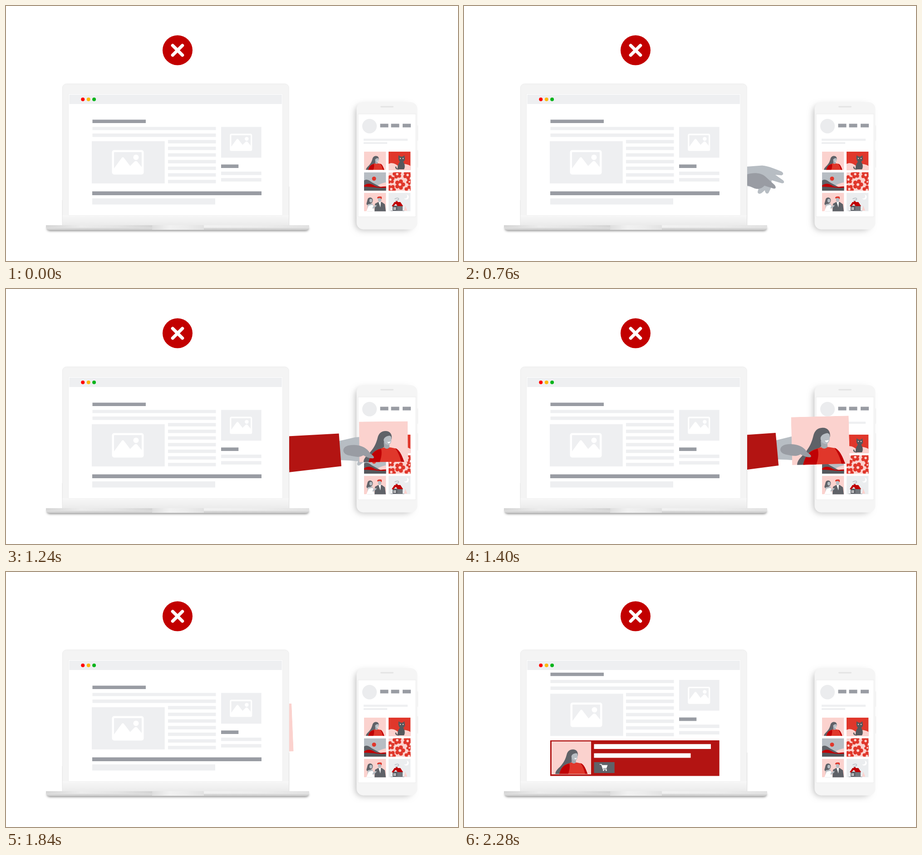
Recreate the animation shown at these times as an HTML page with a canvas. Size 996 by 562 pixels, loop 5.2 s.

```html
<!DOCTYPE html>
<html lang="en">
<head>
<meta charset="utf-8">
<title>Picture grab</title>
<style>
html, body { margin: 0; width: 100%; height: 100%; overflow: hidden; background: #fff; }
canvas { display: block; }
</style>
</head>
<body>
<canvas id="stage" width="996" height="562"></canvas>
<script>
const ctx = document.getElementById('stage').getContext('2d');
const LOOP = 5200, STEP = 40;
const PALE = '#eeeff1', GREY = '#999ca3', LIGHT = '#b7bdc3', DARK = '#5f6268';
const RED = '#b31412', BRIGHT = '#e0372b', DEEP = '#c00205', PINK = '#fbd2ce';

// Arm pose over time: ms, x, y, angle
const POSES = [
  [520, 534, 387, 0], [760, 610, 378, 0], [1040, 716, 360, 0],
  [1160, 736, 356, -.01], [1280, 731, 354, -.025], [1400, 690, 353, -.035],
  [1600, 590, 358, -.045], [1840, 473, 366, -.052]
];
const GRAB = 1000, GROWN = 1320, HIDDEN = 1880;

const clamp = v => Math.max(0, Math.min(1, v));

function rect(x0, y0, x1, y1, color) {
  ctx.fillStyle = color;
  ctx.fillRect(x0, y0, x1 - x0, y1 - y0);
}
function round(x0, y0, x1, y1, r, color) {
  ctx.fillStyle = color;
  ctx.beginPath();
  ctx.roundRect(x0, y0, x1 - x0, y1 - y0, r);
  ctx.fill();
}
function dot(x, y, r, color, ry = r) {
  ctx.fillStyle = color;
  ctx.beginPath();
  ctx.ellipse(x, y, r, ry, 0, 0, Math.PI * 2);
  ctx.fill();
}
function shape(d, color) {
  ctx.fillStyle = color;
  ctx.fill(new Path2D(d));
}
function line(d, color, width, cap = 'round') {
  ctx.strokeStyle = color;
  ctx.lineWidth = width;
  ctx.lineCap = cap;
  ctx.stroke(new Path2D(d));
}
function fade(x0, y0, x1, y1, ...colors) {
  const g = ctx.createLinearGradient(x0, y0, x1, y1);
  colors.forEach((c, i) => g.addColorStop(i / (colors.length - 1), c));
  return g;
}
function group(x, y, scale, draw) {
  ctx.save();
  ctx.translate(x, y);
  ctx.scale(scale, scale);
  draw();
  ctx.restore();
}
function tile(x, y, w, h, color, draw, scale = 1) {
  group(x, y, scale, () => {
    ctx.beginPath();
    ctx.rect(0, 0, w, h);
    ctx.clip();
    rect(0, 0, w, h, color);
    draw();
  });
}

function portrait(x, y, width) {
  tile(x, y, 127, 105.5, PINK, () => {
    shape('M69 25C80 25 86 33 85 44L80 58L62 68C56 80 44 82 36 90L28 106H11C11 92 25 86 33 74C41 64 45 54 48 43C51 31 58 25 69 25Z', DARK);
    shape('M24 106C29 86 38 75 54 71L66 67L82 68L97 71C106 78 112 92 117 106Z', BRIGHT);
    shape('M24 106C29 86 38 75 57 71C60 82 57 95 53 106Z', DEEP);
    shape('M94 70C106 74 112 92 117 106H109C106 92 101 80 94 70Z', DEEP);
    shape('M64 54H78L79 67C76 72 69 72 65 68Z', '#a4a9af');
    shape('M64 50C63 43 70 38 79 37C84 38 85 42 84 48C84 56 80 61 75 61C69 60 65 56 64 50Z', LIGHT);
    shape('M73 53Q78 54 82 52Q80 58 76 57Z', '#fff');
  }, width / 127);
}

function cat(x, y) {
  tile(x, y, 48.5, 40.5, BRIGHT, () => {
    shape('M0 27C8 23 15 27 20 31C29 26 40 26 49 32V41H0Z', PINK);
    shape('M22 8L27 11H31L35 8L36 16C36 20 33 22 32 22C36 27 37 34 34 39H22C18 38 20 28 25 22C22 20 21 15 22 8Z', '#55585c');
    line('M23 38Q16 39 16 34', '#55585c', 2.5);
    dot(26, 15, 1.2, PINK);
    dot(32, 15, 1.2, PINK);
  });
}

function hills(x, y) {
  tile(x, y, 48.5, 40.5, LIGHT, () => {
    dot(22, 14, 4.5, BRIGHT);
    shape('M49 22C40 24 33 26 25 32V41H49Z', PINK);
    shape('M0 18C7 14 11 18 17 22L41 35H0Z', DARK);
    shape('M0 29C8 23 16 25 24 30C32 34 41 31 49 31V36H0Z', DEEP);
    shape('M0 32C15 31 31 36 49 34V41H0Z', '#55585c');
  });
}

function flower(x, y, r, turn) {
  for (let i = 0; i < 5; i++) {
    const a = turn + i * Math.PI * 2 / 5;
    dot(x + Math.cos(a) * r * .62, y + Math.sin(a) * r * .62, r * .39, BRIGHT);
  }
  dot(x, y, r * .5, BRIGHT);
  dot(x, y, r * .27, PINK);
}
function flowers(x, y) {
  tile(x, y, 48.5, 40.5, PINK, () => {
    [[25, 27, 11.5], [19, 4, 10], [42, 6, 10], [4, 16, 9.5], [6, 37, 10], [45, 39, 10], [46, 21, 7]]
      .forEach(([fx, fy, r], i) => flower(fx, fy, r, i * .7));
  });
}

function couple(x, y) {
  tile(x, y, 48.5, 40.5, PINK, () => {
    shape('M13 10C19 10 21 16 18 21L12 26C7 29 4 25 6 21C8 15 7 11 13 10Z', DARK);
    dot(15, 17, 3.2, LIGHT, 4);
    shape('M8 25L18 23L22 30L18 41H7Z', LIGHT);
    shape('M10 28L19 26L24 41H5Z', '#fff');
    shape('M24 24L31 20L39 20L46 25L48 41H23Z', DARK);
    shape('M32 20H37L36 32Z', '#fff');
    shape('M30 10H38V17C37 21 32 21 31 17Z', LIGHT);
    shape('M29 12C28 8 33 7 38 8C40 10 39 13 38 14L36 11Z', BRIGHT);
    line('M20 33L26 28', LIGHT, 3);
  });
}

function house(x, y) {
  tile(x, y, 48.5, 40.5, '#ebedef', () => {
    dot(39, 9, 5.5, '#fff');
    dot(36.5, 7.5, 4.8, '#ebedef');
    line('M17 20C12 15 25 17 22 12Q19 10 14 13', LIGHT, 1.5);
    shape('M34 39L37 28L41 39Z', PINK);
    rect(9, 28, 31, 39.5, DARK);
    for (let i = 0; i < 3; i++) line(`M20 ${31 + i * 3}H31`, LIGHT, .7);
    shape('M7 29L13 20H26L32 29H20L16 24L10 30Z', DEEP);
    rect(16, 18, 20, 22, DEEP);
    rect(11, 32, 16, 37, '#fff');
    line('M13.5 32V37M11 34.5H16', DARK, .8);
    line('M5 39.5H34', GREY, 1);
  });
}

function phone() {
  ctx.save();
  ctx.shadowColor = 'rgba(0,0,0,.25)';
  ctx.shadowBlur = 14;
  ctx.shadowOffsetX = -5;
  ctx.shadowOffsetY = 3;
  round(775, 216, 900, 491, 15, '#f5f5f5');
  ctx.restore();
  round(905, 263, 908, 297, 1, '#f1f1f1');
  round(905, 318, 908, 356, 1, '#f1f1f1');
  round(772.5, 212, 906.5, 492.5, 15, '#f5f5f5');
  round(825, 220.5, 854, 223.5, 1.5, '#e4e4e4');
  rect(775.5, 237.5, 903.5, 465, '#ececec');
  rect(776.5, 238.5, 902.5, 464, '#fff');
  dot(801, 264.8, 16, '#ebecee');
  [824.5, 848.5, 874].forEach(x => rect(x, 259.5, x + 18, 267.5, GREY));
  rect(788, 292.5, 885, 297, PALE);
  rect(788, 300, 840, 304, PALE);
  portrait(789, 321, 48.5);
  cat(843, 321);
  hills(789, 366.5);
  flowers(843, 366.5);
  couple(789, 412);
  house(843, 412);
}

// Smooth interpolation through the pose keys
function pose(t) {
  const last = POSES.length - 1;
  let i = 0;
  while (i < last - 1 && t >= POSES[i + 1][0]) i++;
  const a = POSES[i], b = POSES[i + 1], span = b[0] - a[0], u = (t - a[0]) / span;
  const slope = (k, c) => {
    const p = POSES[Math.max(0, k - 1)], n = POSES[Math.min(last, k + 1)];
    return (n[c] - p[c]) / (n[0] - p[0]) * span;
  };
  const u2 = u * u, u3 = u2 * u;
  return [1, 2, 3].map(c =>
    (2 * u3 - 3 * u2 + 1) * a[c] + (u3 - 2 * u2 + u) * slope(i, c) +
    (3 * u2 - 2 * u3) * b[c] + (u3 - u2) * slope(i + 1, c));
}

function openHand() {
  shape('M-12 -20L13 -24L47 -26.5C62 -25 78 -18 90 -13C96 -9 93 -4 87 -5L76 -6L93 6C98 11 94 14 88 12L68 6L66 24L61 34C57 38 53 33 53 28L46 34C40 38 34 35 39 26L30 20L-12 18Z', LIGHT);
  shape('M-12 -5L14 -7C28 -11 42 -11 53 -3L74 16C79 22 77 26 71 24L52 18C46 25 36 27 28 23L14 17L-12 12Z', GREY);
}
function fist(t) {
  shape('M-10 -17L0 -20L34 -27C50 -29 62 -24 72 -21L80 -5L74 12L54 20L54 26L42 35C37 36 35 33 39 26L20 24L-10 22Z', LIGHT);
  const w = 48.5 * (1 + 1.62 * clamp((t - GRAB) / (GROWN - GRAB)));
  ctx.save();
  ctx.translate(96, -16);
  ctx.rotate(.01);
  portrait(-w / 2, -w * .415, w);
  ctx.restore();
  shape('M7 1C8 -8 20 -11 32 -10C48 -9 60 -2 66 9C73 14 76 18 73 20C65 21 58 17 51 13C41 19 31 15 21 13C12 11 7 7 7 1Z', GREY);
}
function arm(t) {
  if (t < POSES[0][0] || t >= HIDDEN) return;
  const [x, y, a] = pose(t);
  ctx.save();
  ctx.translate(x, y);
  ctx.rotate(a);
  t < GRAB ? openHand() : fist(t);
  shape('M-2 -36L2 36L-300 65L-300 -26Z', RED);
  ctx.restore();
}

function pictureIcon(x, y, scale) {
  group(x, y, scale, () => {
    round(-35, -27, 35, 27, 5, '#fff');
    round(-30.5, -22.5, 30.5, 22.5, 1, PALE);
    shape('M-31 14L-14 -9C-12 -12 -10 -12 -8 -9L5 8L14 -1C17 -4 20 -3 22 0L31 11V23H-31Z', '#fff');
    dot(18, -11, 6, '#fff');
  });
}

function article(shift) {
  const big = shift ? 1 : 0;
  ctx.save();
  ctx.translate(0, shift);
  rect(190.5, 250.5, 308, 258, GREY);
  rect(190.5, 266.5, 462.5, 273.5, PALE);
  rect(190.5, 281, 462.5, 288.5, PALE);
  for (let i = 0; i < 7; i++) rect(357, 295.3 + i * 14.65, 462.5, 302.8 + i * 14.65, PALE);
  rect(189 + big, 298 - big, 349.7 + big, 391 - big, PALE);
  pictureIcon(268.5 + big, 344.5 - big, 1);
  rect(474, 266.5, 562.7, 334.3, PALE);
  pictureIcon(517.8, 300.5, .7);
  rect(474, 349.3, 512.3, 357, GREY);
  rect(474, 365, 562.7, 372.5, PALE);
  rect(474, 379.3, 562.7, 386.8, PALE);
  ctx.restore();
}

function banner() {
  rect(190, 371, 562.7, 449.5, RED);
  rect(193, 373.5, 280, 446, '#f6e4e3');
  portrait(193.8, 374.3, 85.3);
  rect(286.5, 379.3, 544, 390, '#fff');
  rect(286.5, 399.5, 499.5, 409.5, '#fff');
  rect(286.5, 419, 331.7, 443, DARK);
  line('M299.5 424H303L306.5 434.5H314', '#fff', 1.6);
  shape('M303.5 425.5H316.5L314 432.5H306Z', '#fff');
  dot(307.5, 437, 1.6, '#fff');
  dot(313.3, 437, 1.6, '#fff');
}

function page(t) {
  const later = t >= 2080;
  if (later) {
    article(-28.7);
    banner();
  } else {
    article(0);
    rect(190, 408.5, 563, 417, GREY);
    rect(190, 424, 461, 437.5, PALE);
  }
  const veil = later ? 1 - (t - 2080) / 200 : (t - 1840) / 200;
  rect(139, 216.5, 608, 460, `rgba(255,255,255,${clamp(veil)})`);
}

function laptop(t) {
  ctx.save();
  ctx.shadowColor = 'rgba(0,0,0,.5)';
  ctx.shadowBlur = 5;
  ctx.shadowOffsetY = 2;
  round(90, 487, 667, 493.5, [0, 0, 6, 6], '#bbb');
  ctx.restore();
  round(123.7, 170.7, 624, 484, [10, 10, 0, 0], '#f0f0f0');
  round(125.5, 172.5, 622.5, 484, [8, 8, 0, 0], '#f4f4f4');
  rect(124, 461, 624, 484, fade(0, 461, 0, 484, '#f7f7f7', '#ebebeb'));
  rect(623, 398, 624.3, 484, '#e2e2e2');
  rect(123.7, 428, 124.7, 484, '#e6e6e6');
  rect(137, 193.5, 609.7, 461.5, '#ededed');
  rect(138, 194, 609, 461, '#fff');
  rect(139.3, 195.3, 608, 216, PALE);
  dot(169.3, 205.8, 4, '#ff0000');
  dot(181.8, 205.8, 4, '#fbb90b');
  dot(194.1, 205.8, 4, '#07b41c');
  page(t);
  round(88, 483, 668, 494, [1, 1, 7, 7], fade(0, 483, 0, 494, '#f0f0f0', '#e2e2e2', '#c6c6c6'));
  rect(88, 483, 322, 488.5, fade(88, 0, 322, 0, '#d6d6d6', '#ececec', '#e4e4e4', '#d4d4d4'));
  rect(322, 483, 436, 493, fade(322, 0, 436, 0, '#dedede', '#f1f1f1', '#ececec', '#e2e2e2'));
  rect(436, 483, 668, 488.5, fade(436, 0, 668, 0, '#f2f2f2', '#ededed', '#e2e2e2'));
}

function badge() {
  dot(378, 97.5, 33, '#c20000');
  line('M367.3 87L388.7 108.2M388.7 87L367.3 108.2', '#fff', 7.2);
}

function draw(t) {
  rect(0, 0, 996, 562, '#fff');
  badge();
  phone();
  arm(t);
  laptop(t);
}

const start = performance.now();
function tick() {
  const t = (performance.now() - start) % LOOP;
  draw(Math.floor(t / STEP) * STEP);
  requestAnimationFrame(tick);
}
tick();
</script>
</body>
</html>
```
